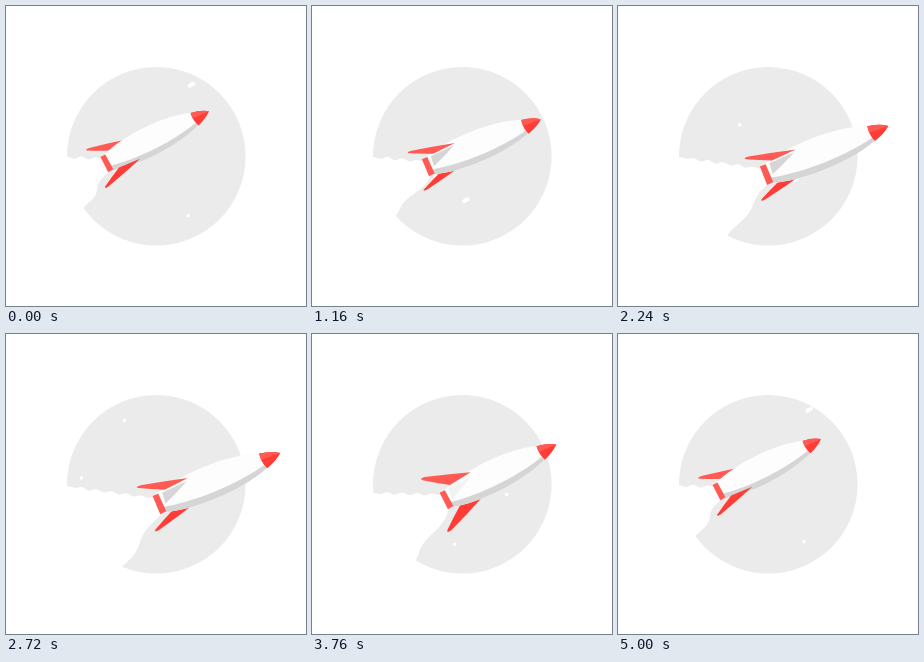
An HTML page with a canvas that plays this animation: 300x300 px, repeating every 5040 ms.

```html
<!DOCTYPE html>
<html lang="en">
<head>
<meta charset="utf-8">
<title>Rocket</title>
<style>
  html, body { margin: 0; width: 100%; height: 100%; overflow: hidden; background: #fff; }
  canvas { display: block; width: 300px; height: 300px; }
</style>
</head>
<body>
<canvas id="stage" width="300" height="300"></canvas>
<script>
const ctx = document.getElementById('stage').getContext('2d');
const LOOP = 5040, STEP = 40, TAU = 2 * Math.PI, RAD = Math.PI / 180;
const DISC = { x: 150.3, y: 150.3, r: 89.3 };
const RED = '#ff3c35', LIGHT_RED = '#ff5b54', GREY = '#ebebeb', SHADE = '#d5d5d5';
const DIR = { x: .88, y: -.475 };

function seeded(seed) {
  return () => {
    seed = (seed * 16807) % 2147483647;
    return seed / 2147483647;
  };
}

// Dots, dashes and streaks that rush past the rocket
const KINDS = [{ len: 0, speed: .11 }, { len: 4, speed: .16 }, { len: 20, speed: .4 }];
const rand = seeded(7);
const specks = Array.from({ length: 16 }, (_, i) => ({
  ...KINDS[i % 5 === 4 ? 2 : i % 2],
  time: (i + rand()) / 16 * LOOP,
  offset: (rand() - .5) * 160
}));

// Everything follows one eased swing (0 to 1) and the sway that goes with it
function poseAt(t) {
  const phase = TAU * (t - 40) / LOOP;
  const turn = phase - .05 * (1 - Math.cos(phase));
  const c = (1 - Math.cos(turn)) / 2;
  const swing = c * c + (1 - c) * c * c * (3 - 2 * c);
  const sway = Math.sin(turn);
  const spin = Math.cos(TAU * (t - 2315) / LOOP) + .45;
  return {
    nose: [203 + 71.5 * swing, 105.4 + 14 * swing + 3 * sway],
    tail: [100.7 + 52.5 * swing - 3.5 * sway, 157 + 12.5 * swing - 1.2 * sway],
    roll: -50 * Math.tanh(4 * spin) - 4 * sway,
    exit: (145 - 32 * swing + 5 * sway) * RAD,
    wakeY: 151 + Math.max(0, -sway) * (4 + 7 * swing),
    ripple: 2 * t / LOOP + .69
  };
}

function fill(path, color) {
  ctx.fillStyle = color;
  ctx.fill(new Path2D(path));
}

function onDisc(angle, r) {
  return [DISC.x + r * Math.cos(angle), DISC.y + r * Math.sin(angle)];
}

function drawWake(top, bottom, pose) {
  const [ex, ey] = onDisc(pose.exit, DISC.r);
  const N = 30;
  ctx.beginPath();
  ctx.moveTo(20, pose.wakeY);
  for (let i = 0; i <= N; i++) {
    const s = i / N, x = 60 + (top[0] - 60) * s;
    const wave = 1.3 * Math.sin(TAU * (x - 79) / 15) * Math.min(1, 5 * s, 5 * (1 - s));
    ctx.lineTo(x, pose.wakeY + (top[1] - pose.wakeY) * s + wave);
  }
  for (let i = 0; i <= N; i++) {
    const s = i / N;
    const wave = 3.5 * Math.cos(TAU * (s / 1.05 - pose.ripple)) * Math.sqrt(Math.max(0, Math.sin(Math.PI * s)));
    ctx.lineTo(bottom[0] + (ex - bottom[0]) * s + wave, bottom[1] + (ey - bottom[1]) * s);
  }
  ctx.lineTo(...onDisc(pose.exit, 100));
  ctx.lineTo(20, 260);
  ctx.fillStyle = '#fff';
  ctx.fill();
}

function drawSpecks(t) {
  ctx.strokeStyle = '#fff';
  ctx.lineCap = 'round';
  for (const { len, speed, time, offset } of specks) {
    const dt = (t - time + LOOP * 1.5) % LOOP - LOOP / 2;
    const x = DISC.x - DIR.x * speed * dt - DIR.y * offset;
    const y = DISC.y - DIR.y * speed * dt + DIR.x * offset;
    const h = len / 2 + .01;
    ctx.lineWidth = len ? 4 : 3.4;
    ctx.beginPath();
    ctx.moveTo(x - DIR.x * h, y - DIR.y * h);
    ctx.lineTo(x + DIR.x * h, y + DIR.y * h);
    ctx.stroke();
  }
}

function drawFin(side, spread) {
  const root = side * (6 + 8 * spread), rear = side * (6 + 5.5 * spread), tip = side * 33 * spread;
  const mid = (root + tip) / 2;
  fill(`M32 ${root} Q11 ${mid * 1.04} -9 ${tip} Q-15 ${tip * 1.03} -12 ${tip * .93}
        Q-2 ${(rear + tip) * .47} 9 ${rear} Z`, side < 0 ? LIGHT_RED : RED);
}

// Local units: the tail is at 0, the nose at 116 on the x axis
function drawRocket(roll) {
  const spread = Math.cos(roll * RAD), front = roll > 0 ? 1 : -1;
  drawFin(-front, spread);
  fill('M2 -9 C25 -16.5 70 -18 99 -6.8 L100 7.6 C70 18 25 16.5 2 9 Z', '#fdfdfd');
  fill('M2 4 C30 10.5 70 11 100 4 L100 7.6 C70 18 25 16.5 2 9 Z', SHADE);
  ctx.globalAlpha = Math.min(1, Math.max(0, (-roll - 25) / 25));
  fill('M30 -9 Q18 -3 5 2 L6 -8 Z', SHADE);
  ctx.globalAlpha = 1;
  fill('M98.5 -6.8 Q110 -5 116 0 Q110 5 100 8 Q97 1 98.5 -6.8 Z', RED);
  fill('M98.5 -6.8 Q110 -5 116 0 L98 -1 Z', LIGHT_RED);
  fill('M-3 -8.5 L2.5 -8.5 L3 8.5 L-3 9 Z', LIGHT_RED);
  drawFin(front, spread);
}

function draw(t) {
  const pose = poseAt(t);
  const [nx, ny] = pose.nose, [tx, ty] = pose.tail;
  const c = (nx - tx) / 116, s = (ny - ty) / 116;
  const place = (a, b) => [tx + a * c - b * s, ty + a * s + b * c];

  ctx.fillStyle = '#fff';
  ctx.fillRect(0, 0, 300, 300);
  ctx.fillStyle = GREY;
  ctx.beginPath();
  ctx.arc(DISC.x, DISC.y, DISC.r, 0, TAU);
  ctx.fill();

  drawWake(place(-2, -6), place(-2, 9), pose);
  drawSpecks(t);

  ctx.save();
  ctx.transform(c, s, -s, c, tx, ty);
  drawRocket(pose.roll);
  ctx.restore();
}

const start = performance.now();
function tick() {
  const t = (performance.now() - start) % LOOP;
  draw(Math.floor(t / STEP) * STEP);
  requestAnimationFrame(tick);
}
tick();
</script>
</body>
</html>
```
